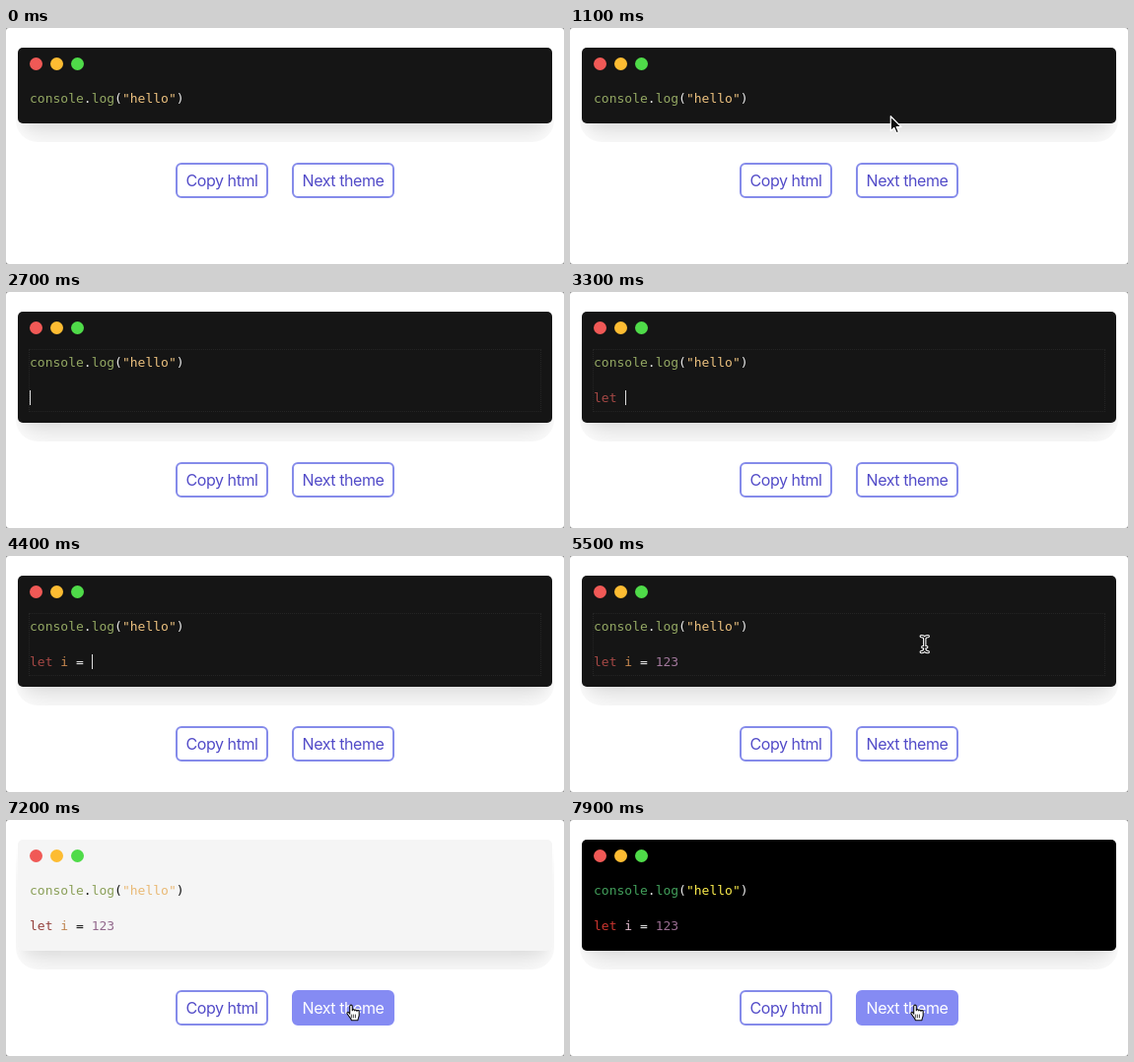
Animation, 566 px wide and 240 px high, one loop 8 s. Source, as an HTML page:

```html
<!DOCTYPE html>
<html lang="en">
<head>
<meta charset="utf-8">
<title>Code editor themes</title>
<style>
  html, body { margin: 0; width: 100%; height: 100%; overflow: hidden; background: #8c8c8c; }
  #stage { position: relative; width: 566px; height: 240px; overflow: hidden; background: #fff; border-radius: 3px; }
  #stage * { box-sizing: border-box; }
  #shade { position: absolute; left: 10px; top: 20px; width: 546px; overflow: hidden; border-radius: 4px 4px 22px 22px; }
  #editor {
    position: absolute; left: 2px; top: 0; width: 542px; border-radius: 5px;
    box-shadow: 0 20px 25px -5px rgba(0,0,0,.1), 0 10px 10px -5px rgba(0,0,0,.04);
  }
  .dot { position: absolute; top: 10px; width: 13px; height: 13px; border-radius: 50%; }
  #focus { position: absolute; left: 11px; top: 38px; width: 520px; border: 1px dotted #242424; }
  #code {
    position: absolute; left: 12px; top: 43px; margin: 0; white-space: pre;
    font: 13px/18px "DejaVu Sans Mono", monospace;
  }
  #code .match { background: #328c8270; }
  #caret { position: absolute; width: 1px; height: 15px; background: #dedede; }
  .btn {
    position: absolute; height: 36px; border: 2px solid #858bea; border-radius: 6px;
    font: 16px/32px Inter, "Liberation Sans", sans-serif; letter-spacing: -.42px;
    text-align: center; white-space: nowrap; color: #524bc8; background: #fff;
  }
  .btn.hover { background: #858bf3; border-color: #858bf3; color: #fff; }
  svg { position: absolute; left: 0; top: 0; }
</style>
</head>
<body>
<div id="stage">
  <div id="shade">
    <div id="editor">
      <i class="dot" style="left:12px;background:#f05956"></i>
      <i class="dot" style="left:33px;background:#fdbc32"></i>
      <i class="dot" style="left:54px;background:#4fdb49"></i>
      <div id="focus"></div>
      <pre id="code"></pre>
      <div id="caret"></div>
    </div>
  </div>
  <div class="btn" id="copy" style="left:172px;width:94px">Copy html</div>
  <div class="btn" id="next" style="left:290px;width:104px">Next theme</div>
  <svg width="566" height="240" fill="none" stroke-linecap="round" stroke-linejoin="round">
    <circle id="ring" cx="356" cy="181" r="30.5" stroke="#111" stroke-width="1.5"/>
    <g id="beam">
      <path id="beamLine" d="M-3.5-8Q0-8 0-5V5Q0 8-3.5 8M3.5-8Q0-8 0-5M0 5Q0 8 3.5 8M-2 3H2" stroke="#fff" stroke-width="3.4"/>
      <use href="#beamLine" id="beamCore"/>
      <path d="M-3.5-8Q0-8 0-5V5Q0 8-3.5 8M3.5-8Q0-8 0-5M0 5Q0 8 3.5 8M-2 3H2" stroke="#111" stroke-width="1.2"/>
    </g>
    <g id="arrow">
      <path d="M0 0V15L3.5 11.8 5.8 17 8.2 16 6 10.9H10.8Z" fill="#111" stroke="#fff" stroke-width="1.2"/>
    </g>
    <g id="hand">
      <path transform="translate(-4.8 -.8)" fill="#fff" stroke="#111" stroke-width="1.1"
        d="M3.5 10V2.2a1.3 1.3 0 0 1 2.6 0V6.5a1.2 1.2 0 0 1 2.4 .2 1.2 1.2 0 0 1 2.3 .5 1.1 1.1 0 0 1 2.2 .6V11c0 2-1 3-1.3 5.5H5.2C4.8 14 2 12 .9 9.9c-.7-1.3.7-2.3 1.7-1.2z"/>
      <path d="M2.3 10V13M4.4 10V13M.3 10V13" stroke="#111" stroke-width=".8"/>
    </g>
  </svg>
</div>
<script>
const $ = id => document.getElementById(id);
const LOOP = 8000, CHAR = 7.83, LINE = 18;

$("beamCore").remove();

const themes = {
  dark:  { bg: "#151515", fg: "#ececec", name: "#94a863", str: "#ecc17f", key: "#a54845", def: "#c8884f", num: "#a2789c" },
  light: { bg: "#f5f5f5", fg: "#111111", name: "#8a9f58", str: "#e9b975", key: "#94403c", def: "#bf844f", num: "#93698d" },
  black: { bg: "#000000", fg: "#eeeeee", name: "#429f5b", str: "#fced4d", key: "#cb352f", def: "#e3bdcf", num: "#996d91" }
};

const enters = [2000, 2500];
const typed = "let i = 123";
const keys = [2900, 3000, 3100, 3200, 4100, 4200, 4300, 4400, 4600, 4750, 4900];
const within = (t, a, b) => t >= a && t < b;
const count = (times, t) => times.filter(k => t >= k).length;

function bezier(p, u) {
  const v = 1 - u;
  const at = i => v * v * v * p[0][i] + 3 * v * v * u * p[1][i] + 3 * v * u * u * p[2][i] + u * u * u * p[3][i];
  return [at(0), at(1)];
}

const toCode = [[352, 128], [320, 60], [270, 65], [240, 80]];
const toButton = [[240, 80], [490, 80], [470, 170], [356, 181]];
const settle = [[356, 181], [354, 183], [351, 186], [350, 188]];

function ease(t, a, b) {
  const u = Math.min(1, Math.max(0, (t - a) / (b - a)));
  return u * u * (3 - 2 * u);
}

function mouseAt(t) {
  if (within(t, 900, 2000)) return bezier(toCode, ease(t, 850, 1620));
  if (within(t, 5300, 6600)) return bezier(toButton, ease(t, 5250, 6120));
  if (t >= 6600) return bezier(settle, ease(t, 6550, 6800));
  return null;
}

function codeHtml(theme, text, match) {
  const span = (kind, s, cls = "") => `<span class="${cls}" style="color:${theme[kind]}">${s}</span>`;
  const cls = match ? "match" : "";
  const first = span("name", "console") + span("fg", ".") + span("name", "log") +
    span("fg", "(", cls) + span("str", '"hello"') + span("fg", ")", cls);
  const word = text.slice(0, 3);
  return first + "\n\n" + span(word === "let" ? "key" : "name", word) +
    span("def", text.slice(3, 5)) + span("fg", text.slice(5, 8)) + span("num", text.slice(8));
}

const show = (id, on) => { $(id).style.display = on ? "" : "none"; };
let lastCode = "";

function render(t) {
  const theme = t < 6400 ? themes.dark : t < 7300 ? themes.light : themes.black;
  const rows = count(enters, t);
  const chars = count(keys, t);
  const height = 77 + rows * LINE;
  const focused = within(t, 1900, 6200);

  $("shade").style.height = height + 19 + "px";
  $("editor").style.height = height + "px";
  $("editor").style.background = theme.bg;
  $("focus").style.height = 28 + rows * LINE + "px";
  show("focus", focused);

  const html = codeHtml(theme, typed.slice(0, chars), within(t, 1900, 2000));
  if (html !== lastCode) $("code").innerHTML = lastCode = html;

  const blinkOff = within(t, 3550, 4100) || within(t, 5430, 5960);
  show("caret", focused && !blinkOff);
  const column = rows ? chars : 20;
  $("caret").style.left = Math.round(12.4 + column * CHAR) + "px";
  $("caret").style.top = 44 + rows * LINE + "px";

  const top = 137 + rows * LINE;
  $("copy").style.top = $("next").style.top = top + "px";

  const mouse = mouseAt(t);
  let kind = "";
  if (mouse) {
    const [x, y] = mouse;
    const onButton = within(x, 290, 394) && within(y, top, top + 36);
    const onCode = within(x, 23, 543) && within(y, 58, 86 + rows * LINE);
    kind = onButton ? "hand" : onCode ? "beam" : "arrow";
    $(kind).setAttribute("transform", `translate(${x.toFixed(2)} ${y.toFixed(2)})`);
  }
  for (const id of ["hand", "beam", "arrow"]) show(id, id === kind);
  $("next").classList.toggle("hover", kind === "hand");
  show("ring", within(t, 6200, 6400));
}

const start = performance.now();
function tick() {
  render((performance.now() - start) % LOOP);
  requestAnimationFrame(tick);
}
render(0);
requestAnimationFrame(tick);
</script>
</body>
</html>
```
